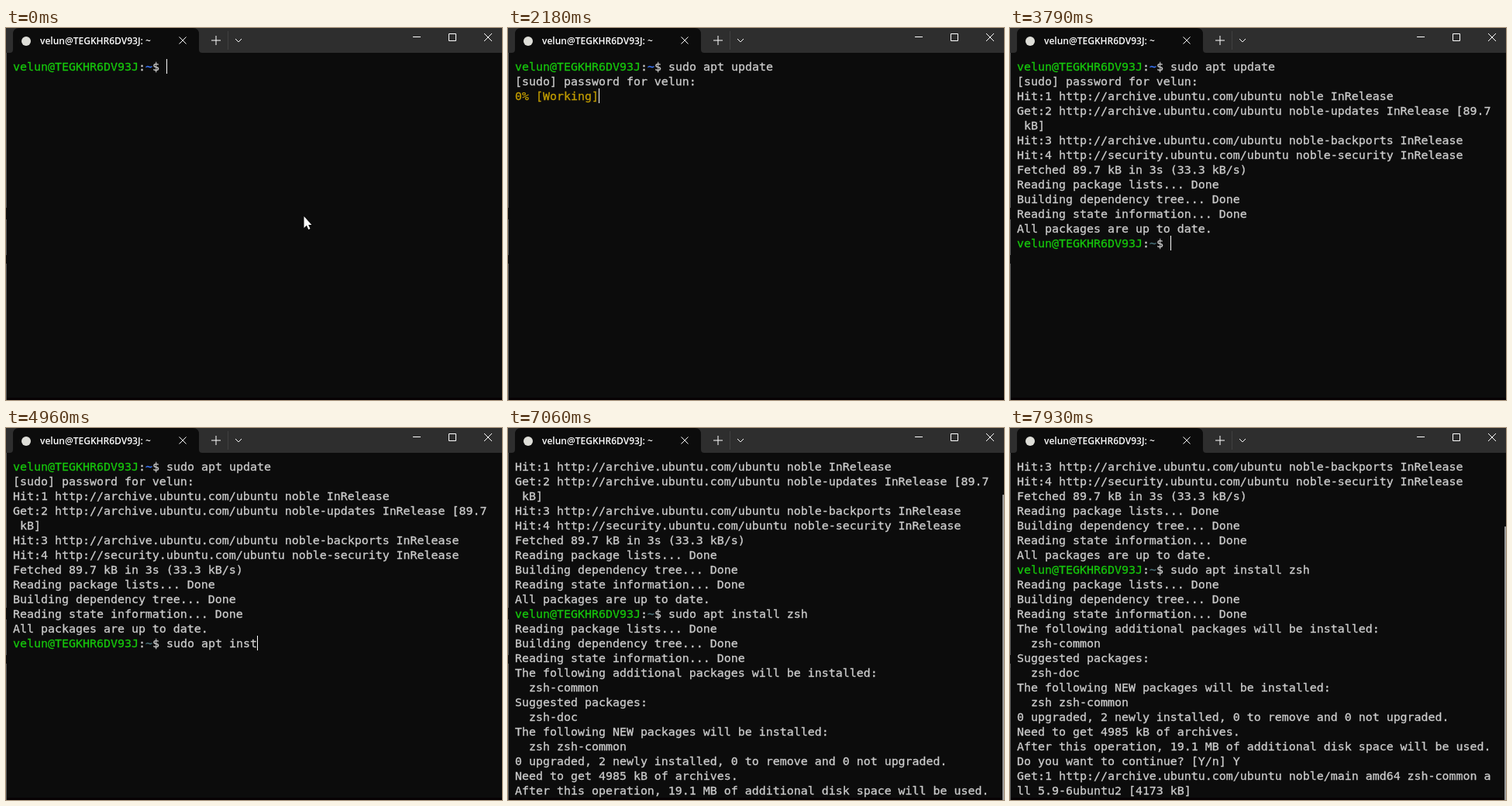
An HTML page with a canvas for the animation above (8 s loop, 640x480 px).

```html
<!DOCTYPE html>
<html lang="en">
<head>
<meta charset="utf-8">
<title>Terminal</title>
<style>
html, body { margin: 0; width: 100%; height: 100%; overflow: hidden; background: #0c0c0c; }
canvas { display: block; }
</style>
</head>
<body>
<canvas id="stage" width="640" height="480"></canvas>
<script>
const ctx = document.getElementById('stage').getContext('2d');
const LOOP = 8000, COL = 9, ROW = 19, LEFT = 9, TOP = 40, ROWS = 24;
const GREY = '#cccccc', GREEN = '#16c60c', AMBER = '#c19c00', BACK = '#0c0c0c';
const USER = 'velun', LOGIN = USER + '@TEGKHR6DV93J', PROMPT = LOGIN + ':~$ ';

const CMD1 = 'sudo apt update', CMD2 = 'sudo apt install zsh';
const KEYS1 = [90, 190, 290, 390, 490, 580, 680, 780, 880, 1010, 1100, 1190, 1380, 1500, 1690];
const KEYS2 = [3880, 3980, 4090, 4090, 4190, 4280, 4380, 4480, 4570, 4670, 4670, 4770,
  4960, 5050, 5050, 5270, 5370, 5470, 5470, 5570];
const CARET_OFF = [[6160, 6750], [7060, 7430], [7930, LOOP]];

const CHECKS = ['Reading package lists... Done', 'Building dependency tree... Done',
  'Reading state information... Done'];
const ASK = 'Do you want to continue? [Y/n] ';
const LOG = [
  PROMPT + CMD1,
  `[sudo] password for ${USER}:`,
  'Hit:1 http://archive.ubuntu.com/ubuntu noble InRelease',
  'Get:2 http://archive.ubuntu.com/ubuntu noble-updates InRelease [89.7',
  ' kB]',
  'Hit:3 http://archive.ubuntu.com/ubuntu noble-backports InRelease',
  'Hit:4 http://security.ubuntu.com/ubuntu noble-security InRelease',
  'Fetched 89.7 kB in 3s (33.3 kB/s)',
  ...CHECKS,
  'All packages are up to date.',
  PROMPT + CMD2,
  ...CHECKS,
  'The following additional packages will be installed:',
  '  zsh-common',
  'Suggested packages:',
  '  zsh-doc',
  'The following NEW packages will be installed:',
  '  zsh zsh-common',
  '0 upgraded, 2 newly installed, 0 to remove and 0 not upgraded.',
  'Need to get 4985 kB of archives.',
  'After this operation, 19.1 MB of additional disk space will be used.',
  ASK + 'Y',
  'Get:1 http://archive.ubuntu.com/ubuntu noble/main amd64 zsh-common a',
  'll 5.9-6ubuntu2 [4173 kB]'
];

// start time, finished log lines, text on the line with the caret
const STEPS = [
  [0, 0, t => PROMPT + typed(CMD1, KEYS1, t)],
  [1780, 1, `[sudo] password for ${USER}: `],
  [2180, 2, '0% [Working]'],
  [2680, 3, '0% [Waiting for headers]'],
  [2770, 5, '0% [2 InRelease 0 B/89.7 kB 0%]'],
  [2860, 5, '0% [2 InRelease 12.7 kB/89.7 kB 14%] [Connecting to security.ubuntu'],
  [3080, 6, '0% [Connecting to security.ubuntu.com]'],
  [3390, 7, '0% [Working]'],
  [3490, 8, 'Reading package lists... 0%'],
  [3590, 8, 'Reading package lists... 50%'],
  [3690, 9, 'Building dependency tree... 50%'],
  [3790, 12, t => PROMPT + typed(CMD2, KEYS2, t)],
  [6970, 13, 'Reading package lists... 50%'],
  [7060, 25, ASK],
  [7430, 26, '0% [Working]'],
  [7650, 28, '0% [1 zsh-common 36.9 kB/4173 kB 1%]']
];

const typed = (cmd, keys, t) => cmd.slice(0, keys.filter(k => k <= t).length);

function rect(x, y, w, h, color) {
  ctx.fillStyle = color;
  ctx.fillRect(x, y, w, h);
}

function stroke(path, color = '#ffffff') {
  ctx.strokeStyle = color;
  ctx.lineWidth = 1;
  ctx.stroke(new Path2D(path));
}

function fill(path, color) {
  ctx.fillStyle = color;
  ctx.fill(new Path2D(path));
}

// a hairline outline gives the glyphs their weight
function put(text, col, row, color) {
  const x = LEFT + col * COL, y = TOP + row * ROW + 15;
  ctx.fillStyle = ctx.strokeStyle = color;
  ctx.lineWidth = 0.3;
  ctx.fillText(text, x, y);
  ctx.strokeText(text, x, y);
}

function drawLine(text, row, index) {
  if (!text.startsWith(PROMPT)) {
    put(text, 0, row, text.startsWith('0% ') ? AMBER : GREY);
    return;
  }
  const n = LOGIN.length;
  put(LOGIN, 0, row, GREEN);
  put(':', n, row, GREY);
  put('~', n + 1, row, index ? '#4a737c' : '#3b78ff');
  put(text.slice(n + 2), n + 2, row, GREY);
}

function drawBar() {
  rect(0, 0, 640, 32, '#2e2e2e');
  fill('M5 32Q9 32 9 28V8Q9 0 17 0H241Q249 0 249 8V28Q249 32 253 32Z', BACK);
  fill('M20 17a6 6 0 1 0 12 0a6 6 0 1 0 -12 0Z', '#deded8');
  ctx.font = '600 12px "Open Sans", "Noto Sans", sans-serif';
  ctx.fillStyle = '#ffffff';
  ctx.fillText(LOGIN + ': ~', 44, 21);
  stroke('M223.5 11.5l9 9m0 -9l-9 9');
  stroke('M265 16h12M271 10v12');
  stroke('M286.5 4v24', '#404040');
  stroke('M296 14l4 4l4 -4');
  stroke('M525 11.5h10M571.5 7.5h9v9h-9zM617 7l10 10m0 -10l-10 10');
}

function drawPointer() {
  const arrow = 'M384.5 243v15l3.4 -3.2l2.4 5.2l2.2 -1l-2.3 -5h4.2Z';
  stroke(arrow, '#000000');
  fill(arrow, '#ffffff');
}

function draw(t) {
  const [, done, last] = STEPS.findLast(s => s[0] <= t);
  const tail = typeof last === 'function' ? last(t) : last;
  const scroll = Math.max(0, done + 1 - ROWS);

  rect(0, 0, 640, 480, BACK);
  rect(0, 477, 640, 3, '#070204');
  rect(0, 32, 1, 448, '#5c5c5c');
  rect(0, 232, 1, 15, '#141414');
  rect(0, 293, 1, 11, '#141414');
  drawBar();

  // this size makes every glyph nine pixels wide
  ctx.font = '14.95px "DejaVu Sans Mono", "Noto Sans Mono", monospace';
  for (let i = scroll; i < done; i++) drawLine(LOG[i], i - scroll, i);
  drawLine(tail, done - scroll, done);

  const off = CARET_OFF.some(([from, to]) => t >= from && t < to);
  if (!off) rect(LEFT + tail.length * COL, TOP + (done - scroll) * ROW, 1, ROW, '#ffffff');
  if (scroll) rect(638, 53 + 430 * scroll / (ROWS + scroll), 2, 430, '#9a9a9a');
  if (t < 90 || (t >= 1010 && t < 1100)) drawPointer();
}

const start = performance.now();
function tick() {
  draw((performance.now() - start) % LOOP);
  requestAnimationFrame(tick);
}
tick();
</script>
</body>
</html>
```
